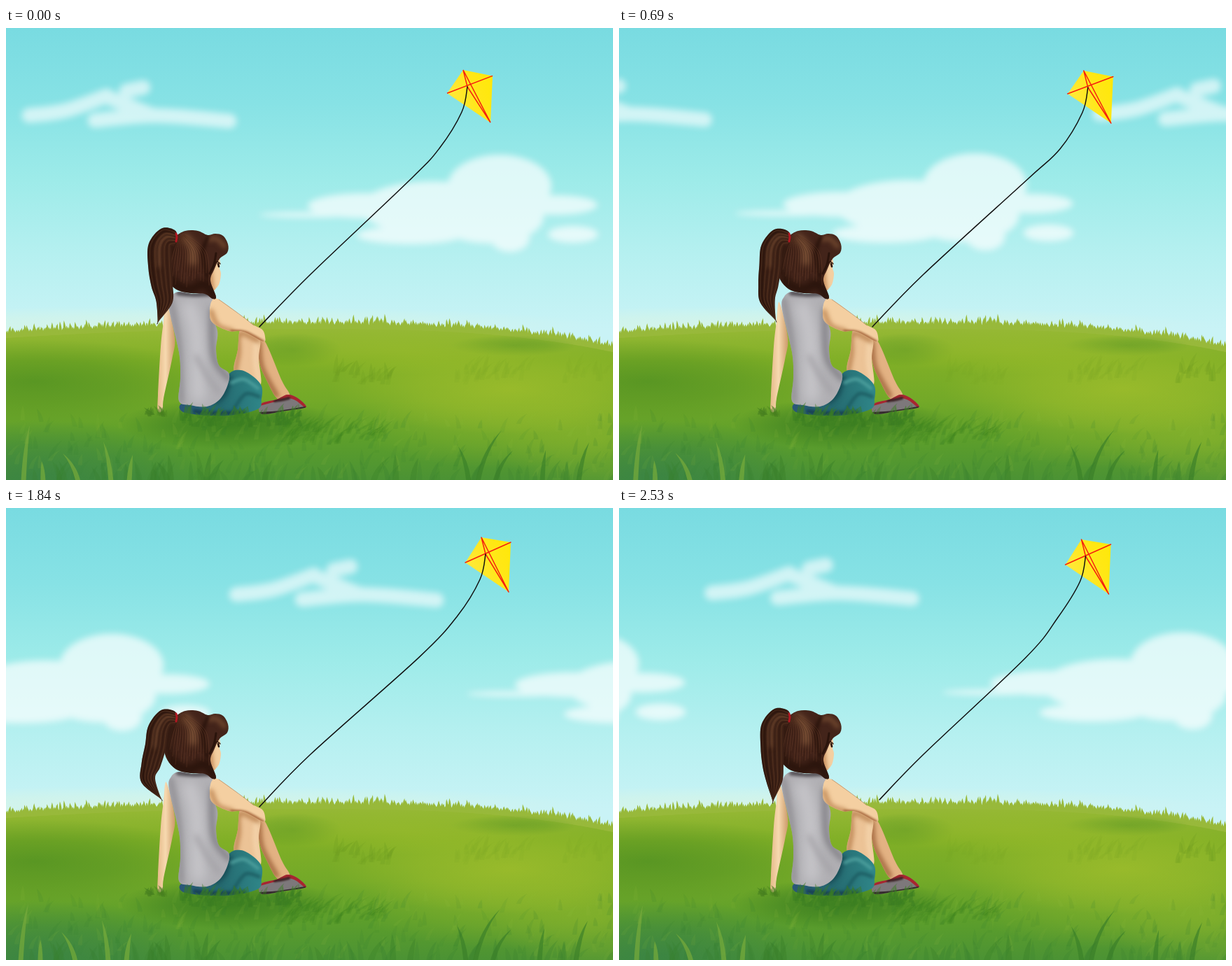
Recreate the animation shown at these times as an HTML page with a canvas. Size 867 px wide and 646 px high, loop 2.76 s.

```html
<!DOCTYPE html>
<html lang="en">
<head>
<meta charset="utf-8">
<title>Girl with a kite</title>
<style>
html, body { margin: 0; width: 100%; height: 100%; overflow: hidden; background: #8fe4e6; }
canvas { display: block; }
</style>
</head>
<body>
<canvas id="stage" width="867" height="646"></canvas>
<script>
const W = 867, H = 646, STEP = 230, STEPS = 12, WRAP = 850;
const ctx = document.getElementById('stage').getContext('2d');

const lerp = (a, b, t) => a + (b - a) * t;

// Value at time i between [time, value] keys
function track(i, ...keys) {
  const k = keys.findIndex(key => key[0] > i);
  const [[t0, a], [t1, b]] = [keys[k - 1], keys[k]];
  return lerp(a, b, (i - t0) / (t1 - t0));
}

function random(seed) {
  return () => {
    seed = (seed * 1664525 + 1013904223) % 4294967296;
    return seed / 4294967296;
  };
}

function layer(draw, w = W, h = H) {
  const c = document.createElement('canvas');
  c.width = w;
  c.height = h;
  draw(c.getContext('2d'));
  return c;
}

// Smooth curve through a flat list of x, y pairs
function curve(p, closed = true) {
  const n = p.length / 2, path = new Path2D();
  const at = i => {
    const k = closed ? (i + n) % n : Math.max(0, Math.min(n - 1, i));
    return [p[2 * k], p[2 * k + 1]];
  };
  path.moveTo(p[0], p[1]);
  for (let i = 0; i < (closed ? n : n - 1); i++) {
    const [a, b, c, d] = [at(i - 1), at(i), at(i + 1), at(i + 2)];
    path.bezierCurveTo(b[0] + (c[0] - a[0]) / 6, b[1] + (c[1] - a[1]) / 6,
      c[0] - (d[0] - b[0]) / 6, c[1] - (d[1] - b[1]) / 6, c[0], c[1]);
  }
  if (closed) path.closePath();
  return path;
}

function line(g, p, color, width, alpha = 1) {
  g.globalAlpha = alpha;
  g.strokeStyle = color;
  g.lineWidth = width;
  g.lineCap = g.lineJoin = 'round';
  g.stroke(curve(p, false));
  g.globalAlpha = 1;
}

function grade(g, x0, y0, x1, y1, ...colors) {
  const f = g.createLinearGradient(x0, y0, x1, y1);
  colors.forEach((c, i) => f.addColorStop(i / (colors.length - 1), c));
  return f;
}

function glow(g, x, y, rx, ry, rgb, alpha) {
  g.save();
  g.translate(x, y);
  g.scale(rx, ry);
  const f = g.createRadialGradient(0, 0, 0, 0, 0, 1);
  f.addColorStop(0, `rgba(${rgb},${alpha})`);
  f.addColorStop(0.5, `rgba(${rgb},${alpha * 0.6})`);
  f.addColorStop(1, `rgba(${rgb},0)`);
  g.fillStyle = f;
  g.fillRect(-1, -1, 2, 2);
  g.restore();
}

// Filled form with soft strokes of shade: [points, color, width, blur]
function form(g, points, fill, ...shades) {
  const path = curve(points);
  g.save();
  g.fillStyle = fill;
  g.fill(path);
  g.clip(path);
  for (const [p, color, width, blur] of shades) {
    g.filter = `blur(${blur}px)`;
    line(g, p, color, width);
  }
  g.restore();
}

// Tapered blade of grass
function blade(g, x, y, tx, ty, width, color) {
  const mx = lerp(x, tx, 0.25), my = lerp(y, ty, 0.6);
  g.fillStyle = color;
  g.beginPath();
  g.moveTo(x - width / 2, y);
  g.quadraticCurveTo(mx - width / 2, my, tx, ty);
  g.quadraticCurveTo(mx + width / 2, my, x + width / 2, y);
  g.fill();
}

// Seeded grass in a box, leaning to the right
function grass(g, seed, count, [x, y, w, h], size, lean, alpha, color) {
  const rnd = random(seed);
  for (let i = 0; i < count; i++) {
    const bx = x + rnd() * w, by = y + rnd() * h;
    g.globalAlpha = alpha * (0.5 + rnd() * 0.5);
    blade(g, bx, by, bx + lean + (rnd() - 0.5) * size, by - size * (0.5 + rnd() * 0.6),
      3 + size / 7, color);
  }
  g.globalAlpha = 1;
}

const sky = layer(g => {
  g.fillStyle = grade(g, 0, 0, 0, 430, '#79dbe1', '#87e2e5', '#9debe9', '#b5f0f0', '#c9f3f6');
  g.fillRect(0, 0, W, H);
  glow(g, 250, 425, 600, 28, '222,245,222', 0.6);
});

const clouds = layer(g => {
  const wisp = new Path2D();
  [[33, 125, 85, 118, 144, 97], [150, 101, 180, 113, 208, 124], [172, 90, 196, 85],
    [127, 132, 215, 125, 319, 133]].forEach(p => wisp.addPath(curve(p, false)));
  g.lineCap = 'round';
  g.lineWidth = 21;
  g.strokeStyle = 'rgba(255,255,255,.62)';
  g.filter = 'blur(5px)';
  g.stroke(wisp);

  const puff = new Path2D();
  [[432, 267, 70, 4], [515, 254, 84, 18], [610, 257, 105, 38], [705, 226, 74, 45],
    [690, 270, 78, 38], [785, 253, 60, 14], [577, 296, 76, 13], [720, 300, 28, 20],
    [810, 295, 36, 12]].forEach(([x, y, rx, ry]) => {
    puff.moveTo(x + rx, y);
    puff.ellipse(x, y, rx, ry, 0, 0, 7);
  });
  g.fillStyle = 'rgba(255,255,255,.68)';
  g.fill(puff);
}, 900, 350);

const hillY = x => x < 400
  ? 424 + 13 * ((400 - x) / 400) ** 2
  : 424 + 33 * ((x - 400) / 467) ** 3;

const ground = layer(g => {
  const rnd = random(7);
  g.fillStyle = grade(g, 0, 420, 0, H, '#9aba38', '#80af26', '#73a928', '#5c9e2b', '#4b9234');
  g.beginPath();
  g.moveTo(0, H);
  for (let x = 0; x <= W; x += 3) g.lineTo(x, hillY(x));
  g.lineTo(W, H);
  g.fill();
  for (let x = -2; x < W + 3; x += 2) {
    const y = hillY(x);
    blade(g, x, y + 6, x + rnd() * 5 - 2.5, y - 4 - rnd() * rnd() * 13, 4.5, '#98b93b');
  }
  g.globalCompositeOperation = 'source-atop';
  const dark = '72,139,33', bright = '160,190,44';
  glow(g, 40, 505, 260, 60, dark, 0.65);
  glow(g, 410, 460, 70, 24, dark, 0.4);
  glow(g, 725, 454, 90, 15, dark, 0.45);
  glow(g, 570, 462, 210, 34, bright, 0.45);
  glow(g, 720, 515, 260, 65, bright, 0.8);
  glow(g, 720, 570, 220, 60, bright, 0.4);
  glow(g, 850, 590, 150, 80, bright, 0.4);
  glow(g, 50, 640, 240, 80, '50,125,75', 0.65);
  glow(g, 320, 566, 160, 36, '50,118,31', 0.8);
  g.globalCompositeOperation = 'source-over';
  grass(g, 3, 130, [0, 560, W, 90], 24, 5, 0.15, '#2e7a30');
  grass(g, 4, 90, [0, 560, W, 90], 24, 5, 0.13, '#93bd3f');
  grass(g, 5, 80, [390, 568, 150, 28], 20, 14, 0.25, '#39801f');
});

// Faint patches of grass that come and go in the wind
const tufts = [[460, 90], [640, 110], [795, 60]].map(([x, w], i) =>
  layer(g => grass(g, 31 + i, w / 4, [x, 488, w, 22], 26, 8, 0.32, '#6c9a20')));

const SKIN = '#f4cfa1', DARK = '#2a140c';

function drawLegs(g) {
  form(g, [360, 445, 371, 450, 394, 504, 405, 525, 388, 530, 372, 503, 362, 478], '#e3b283',
    [[361, 450, 365, 485, 386, 525], '#a76d43', 8, 3]);
  form(g, [335, 430, 352, 434, 363, 447, 361, 472, 364, 509, 348, 503, 326, 491, 331, 460],
    '#ecc396',
    [[358, 448, 357, 480, 363, 508], '#f5d6ae', 6, 3],
    [[360, 447, 334, 437, 332, 465, 327, 492], '#b9814f', 6, 3]);
  // shoe
  form(g, [361, 545, 366, 536, 386, 531, 402, 524, 415, 528, 427, 538, 426, 543, 400, 547, 368, 552],
    '#7d787b',
    [[362, 537, 384, 531, 402, 526, 416, 530, 428, 540], '#a8262f', 6, 0.5],
    [[362, 551, 390, 549, 427, 543], '#352b2d', 4, 0.5],
    [[384, 533, 396, 531, 404, 529], '#3d2427', 4, 1]);
  // shorts
  form(g, [300, 528, 318, 495, 335, 489, 353, 498, 365, 512, 365, 530, 359, 545, 315, 554,
    256, 550, 251, 537, 285, 540], grade(g, 252, 0, 365, 0, '#2a5877', '#256a70', '#2f8688'),
    [[300, 533, 312, 522, 319, 500], '#174b55', 8, 3],
    [[322, 507, 340, 502, 360, 515], '#51a3a0', 4, 2],
    [[325, 545, 342, 523, 362, 527], '#1b5a60', 4, 2],
    [[270, 548, 295, 551, 340, 550], '#173f50', 6, 2]);
}

function drawBody(g) {
  // supporting arm
  form(g, [229, 392, 241, 442, 237, 474, 225, 530, 224, 547, 217, 547, 217, 525, 221, 455, 225, 420],
    grade(g, 216, 0, 240, 0, '#e5b988', '#f7d9af', '#d0a070'));
  drawLegs(g);
  // sleeveless top
  form(g, [247, 377, 268, 380, 289, 378, 296, 388, 291, 404, 302, 433, 300, 459, 304, 482,
    318, 493, 317, 509, 306, 530, 287, 541, 263, 539, 247, 533, 249, 500, 247, 463, 233, 402,
    236, 384], '#b1b0b4',
    [[262, 400, 272, 440, 275, 525], '#c6c5c9', 20, 8],
    [[235, 388, 246, 450, 250, 534], '#8b898e', 7, 4],
    [[294, 404, 297, 470, 318, 501], '#817f85', 8, 4],
    [[272, 470, 289, 500, 304, 520], '#a3a1a6', 6, 4],
    [[246, 379, 270, 381, 291, 380], '#4f4b50', 6, 2]);
  // resting arm
  form(g, [294, 390, 304, 388, 336, 411, 353, 424, 366, 431, 370, 441, 367, 448, 339, 434,
    318, 433, 295, 421, 291, 406], SKIN,
    [[293, 405, 302, 425, 322, 433], '#c48e5c', 7, 3],
    [[322, 433, 342, 435, 367, 448], '#a8693e', 4, 1.5]);
  line(g, [304, 388, 336, 411, 354, 425], '#8f603b', 0.8, 0.6);
}

function drawHead(g) {
  form(g, [300, 325, 306, 334, 305, 343, 307, 351, 305, 364, 301, 371, 294, 377, 286, 372],
    SKIN, [[290, 340, 292, 358, 294, 377], '#ba7c4b', 6, 3]);
  form(g, [242, 298, 256, 290, 274, 290, 288, 296, 299, 294, 310, 297, 317, 309, 316, 321,
    305, 330, 297, 346, 292, 361, 300, 384, 295, 387, 284, 380, 264, 379, 246, 375, 233, 364,
    226, 347, 228, 325, 236, 307], '#43241a',
    [[238, 310, 230, 337, 240, 366], '#2d170e', 9, 4],
    [[240, 366, 262, 374, 284, 365, 296, 384], DARK, 14, 5],
    [[256, 300, 266, 312, 267, 334], '#80563a', 11, 5],
    [[290, 302, 301, 301, 312, 312], '#6d452d', 7, 3],
    [[288, 299, 281, 322, 287, 355], DARK, 5, 2]);
  const rnd = random(19);
  for (let i = 0; i < 30; i++) {
    const k = i / 29;
    line(g, [247 + k * 8, 300 - k * 5, lerp(238, 286, k), 320, 232 + k * 58, 345 + rnd() * 26],
      i % 2 ? '#7b4c30' : DARK, 0.9, 0.35);
  }
  line(g, [300, 322, 297, 338, 291, 351], DARK, 3);
}

const girl = layer(g => {
  drawBody(g);
  drawHead(g);
  grass(g, 8, 90, [250, 553, 175, 18], 18, 2, 0.6, '#3b7d22');
  grass(g, 9, 16, [200, 552, 28, 4], 14, -3, 0.6, '#477f20');
});

// Ponytail: a centre line from hanging to blown out, with a swelling width
const hanging = [242, 300, 229, 299, 220, 312, 220, 340, 223, 368, 226, 392, 217, 420];
const blown = [242, 300, 228, 300, 216, 318, 210, 342, 198, 368, 191, 388, 210, 413];

function drawTail(s) {
  const mid = hanging.map((v, i) => lerp(v, blown[i], s));
  mid[12] += 10 * Math.sin(Math.PI * s);
  const n = mid.length / 2;
  const strand = side => {
    const p = [];
    for (let i = 0; i < n; i++) {
      const a = 2 * Math.max(0, i - 1), b = 2 * Math.min(n - 1, i + 1);
      const dx = mid[b] - mid[a], dy = mid[b + 1] - mid[a + 1], len = Math.hypot(dx, dy);
      const half = side * (17 - 3 * s) * Math.sqrt(Math.abs(Math.sin(Math.PI * (0.1 + 0.9 * i / (n - 1)))));
      p.push(mid[2 * i] - dy / len * half, mid[2 * i + 1] + dx / len * half);
    }
    return p;
  };
  const outer = strand(1), inner = [];
  for (let i = n - 1, p = strand(-1); i >= 0; i--) inner.push(p[2 * i], p[2 * i + 1]);
  form(ctx, outer.concat(inner), '#3d2116', [strand(0.8), '#28130c', 6, 3],
    [strand(0.1).slice(0, 8), '#68422c', 5, 3]);
  for (let k = -4; k < 5; k++) {
    line(ctx, strand(k / 5), k % 2 ? '#22100a' : '#7a4d2f', 1.1, 0.35);
  }
  line(ctx, [243, 294, 244, 299, 243, 305], '#b01822', 3);
}

function drawEye(closed) {
  line(ctx, closed ? [298, 342, 302, 344, 306, 341] : [298, 336, 302, 334, 306, 337], DARK, 1.4);
  if (!closed) line(ctx, [303, 337, 304, 341], DARK, 2.6);
}

function drawKite(i) {
  const x = track(i, [0, 653], [5, 671], [6, 667], [8, 679], [10, 668], [12, 653]);
  const y = track(i, [0, 60], [2, 66], [5, 51], [6, 45], [8, 42], [9, 37], [11, 45], [12, 60]);
  const stretch = Math.min(4, (66 - y) / 5);
  const top = [x, y], right = [x + 42, y + 9 - stretch / 2], left = [x - 23, y + 32 + stretch];
  const foot = [x + 39, y + 74 + stretch], knot = [x + 6, y + 24];

  ctx.fillStyle = grade(ctx, ...left, ...right, '#ffe93c', '#ffe71a', '#ffe808');
  ctx.beginPath();
  [top, right, foot, left].forEach(p => ctx.lineTo(...p));
  ctx.fill();
  const ribs = new Path2D();
  [[left, right], [top, foot], [top, knot], [knot, foot]].forEach(([a, b]) => {
    ribs.moveTo(...a);
    ribs.lineTo(...b);
  });
  ctx.strokeStyle = '#f5200f';
  ctx.lineWidth = 1.5;
  ctx.stroke(ribs);

  const [kx, ky] = knot;
  const reach = track(i, [0, 0], [9, 0], [11, 10], [12, 0]);
  line(ctx, [kx, ky, kx - 8, ky + 36, kx - 40, ky + 88, 577 + (x - 653) / 2, 217 + (y - 60) / 5,
    435, 352, 362 + reach, 427 - reach], '#111', 1.5);
}

// Foreground: a few tall blades over seeded ones
const tall = [[25, 34, 567], [53, 51, 619], [103, 81, 608], [150, 139, 591], [176, 181, 610]];
const shaded = [[661, 646, 598], [674, 708, 575], [699, 724, 604], [766, 771, 603], [818, 833, 592]];

function drawBlades(sway) {
  const x = -4 * sway;
  grass(ctx, 53, 60, [x, H, W, 4], 30, 4, 0.35, '#39802f');
  grass(ctx, 57, 12, [190 + x, H, 400, 3], 42, 6, 0.5, '#397f28');
  const draw = (list, color, alpha) => {
    ctx.globalAlpha = alpha;
    for (const [bx, tx, ty] of list) blade(ctx, bx + x, H + 2, tx + x / 2, ty - sway * 2, 7, color);
  };
  draw(shaded, '#397f28', 0.65);
  draw(tall, '#74a93b', 0.75);
  ctx.globalAlpha = 1;
}

function draw(i) {
  const half = i % 6, shift = half * 65.5 + (i < 6 ? 0 : 423), lift = half * 0.7;
  ctx.drawImage(sky, 0, 0);
  ctx.drawImage(clouds, -shift, -lift);
  ctx.drawImage(clouds, WRAP - shift, -lift);
  ctx.drawImage(ground, 0, 0);
  tufts.forEach((t, k) => {
    ctx.globalAlpha = 0.55 + 0.4 * Math.cos(i * Math.PI / 4 + k * 2);
    ctx.drawImage(t, 0, 0);
  });
  ctx.globalAlpha = 1;
  drawKite(i);
  ctx.drawImage(girl, 0, 0);
  drawEye(i === 5);
  drawTail(track(i, [0, 0], [5, 0.65], [6, 1], [11, 0.12], [12, 0]));
  drawBlades(track(i, [0, 0], [2, 0], [5, 1], [6, 0], [8, 1], [10, 1], [11, 0], [12, 0]));
}

let shown = 0;
const start = performance.now();
function tick(now) {
  const i = Math.floor(Math.max(0, now - start) / STEP) % STEPS;
  if (i !== shown) draw(shown = i);
  requestAnimationFrame(tick);
}
draw(shown);
requestAnimationFrame(tick);
</script>
</body>
</html>
```
